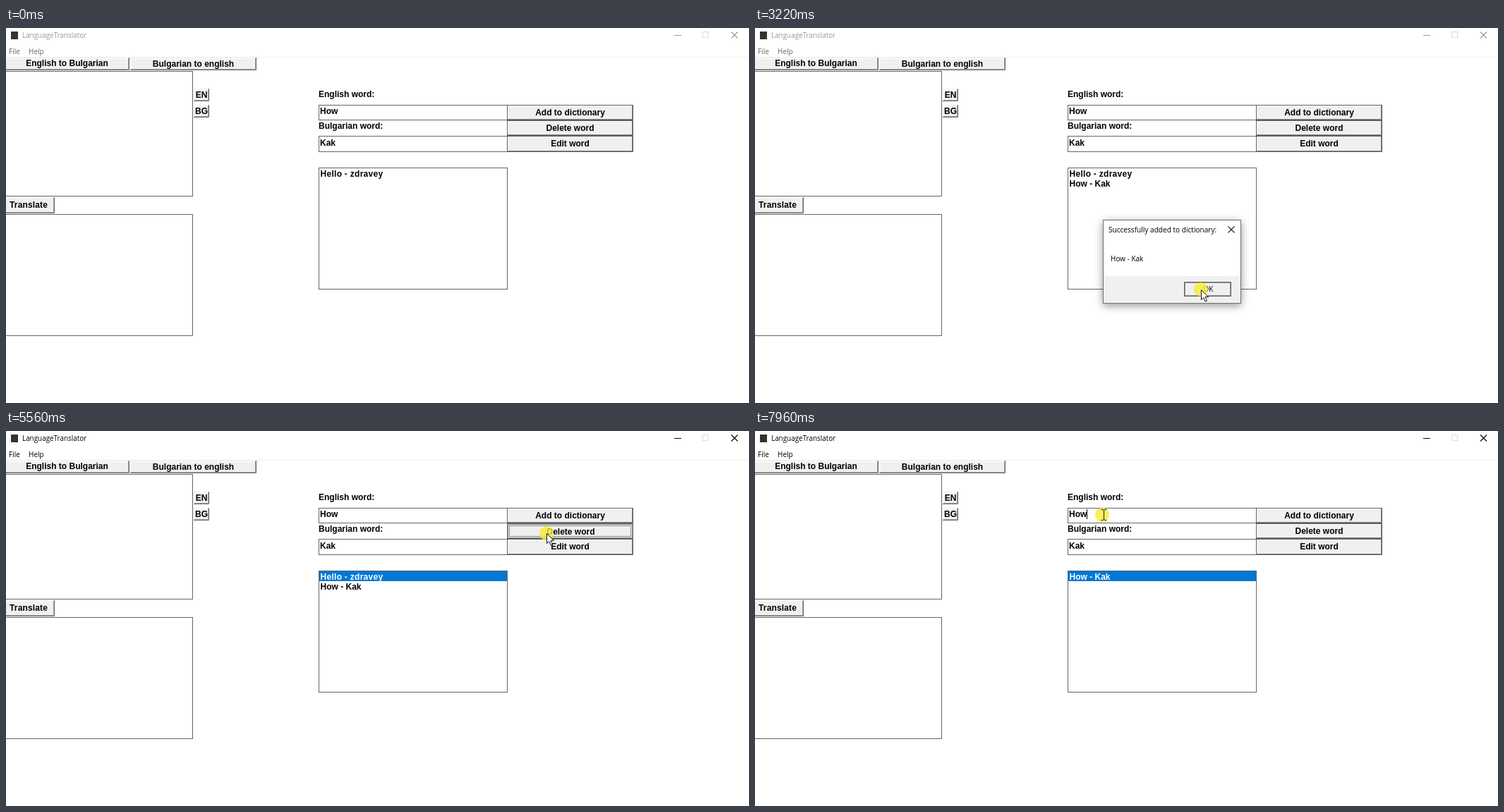
Write an HTML page that moves like this. It is 1053 px wide and 532 px high and loops after 8 s.

```html
<!DOCTYPE html>
<html lang="en">
<head>
<meta charset="utf-8">
<title>LanguageTranslator</title>
<style>
  html, body { margin: 0; width: 100%; height: 100%; overflow: hidden; background: #fff; }
  svg { display: block; width: 1053px; height: 532px; }
  text { white-space: pre; }
  .bold { font: bold 12px "Liberation Sans", Arial, sans-serif; }
  .ui { font: 10px "Open Sans", "Noto Sans", sans-serif; }
  .dialog { filter: drop-shadow(0 3px 6px rgba(0, 0, 0, .42)); }
</style>
</head>
<body>
<svg id="stage" viewBox="0 0 1053 532" xmlns="http://www.w3.org/2000/svg"></svg>
<script>
const LOOP = 8000;
const stage = document.getElementById('stage');

// Pointer moves: start, end, number of steps, target, optional bend
const START = [821, 417];
const MOVES = [
  [70, 440, 6, [533, 137]],
  [670, 1210, 8, [765, 109], [680, 92]],
  [1440, 1750, 5, [777, 116]],
  [2370, 2690, 5, [579, 410]],
  [2770, 2930, 3, [610, 379]],
  [3070, 3220, 3, [632, 371]],
  [3390, 3850, 7, [484, 212]],
  [4230, 4400, 3, [498, 204]],
  [4790, 5000, 4, [747, 147]],
  [5170, 5170, 1, [755, 147]],
  [5400, 5400, 1, [766, 145]],
  [5780, 6100, 5, [645, 370]],
  [6330, 6800, 7, [529, 229]],
  [6950, 6950, 1, [529, 226]],
  [7030, 7180, 3, [514, 207]],
  [7500, 7730, 4, [496, 122]],
  [7900, 7900, 1, [494, 119]]
];
const CLICKS = [[2070, 2140], [3220, 3390], [4540, 4620], [5560, 5630],
                [6250, 6330], [7260, 7360], [7900, LOOP]];
const FIELDS = [[443, 109, 267, 21], [443, 153, 267, 22]];

const within = (t, a, b) => t >= a && t < b;
const ease = u => u * u * (3 - 2 * u);

function pointerAt(t) {
  let from = START;
  for (const [a, b, steps, to, bend] of MOVES) {
    if (t < a) break;
    const gap = (b - a) / (steps - 1) || 1;
    const step = Math.min(steps - 1, Math.floor((t - a) / gap + .06));
    const u = ease((step + 1) / steps), v = 1 - u;
    const start = from;
    from = start.map((p, i) => {
      const mid = bend ? bend[i] : (p + to[i]) / 2;
      return Math.round(v * v * p + 2 * u * v * mid + u * u * to[i]);
    });
  }
  return from;
}

const rect = (x, y, w, h, fill, extra = '') =>
  `<rect x="${x}" y="${y}" width="${w}" height="${h}" fill="${fill}" ${extra}/>`;
const outline = (x, y, w, h, stroke, extra = '', fill = 'none') =>
  rect(x + .5, y + .5, w, h, fill, `stroke="${stroke}" ${extra}`);
const line = (d, stroke, width = 1) =>
  `<path d="${d}" fill="none" stroke="${stroke}" stroke-width="${width}"/>`;
const label = (x, y, text, fill = '#000', cls = 'bold', extra = '') =>
  `<text class="${cls}" x="${x}" y="${y}" fill="${fill}" ${extra}>${text}</text>`;
const centred = (x, y, text, cls = 'bold') =>
  label(x, y, text, '#000', cls, 'text-anchor="middle"');
const dotted = (x, y, w, h, color) => outline(x, y, w, h, color, 'stroke-dasharray="1 1"');
const cross = (x, y, color) =>
  line(`M${x} ${y}l9 9m0 -9l-9 9`, color, 1.1);

function button(x, y, w, h, text, { framed = false, pressed = false, focus = false, cls = 'bold' } = {}) {
  let out = rect(x, y, w, h, '#f0f0f0');
  const shift = pressed ? 1 : 0;
  if (pressed) {
    out += outline(x, y, w - 1, h - 1, '#696969') + outline(x + 1, y + 1, w - 3, h - 3, '#909090');
  } else {
    const r = x + w, b = y + h;
    out += line(`M${x + 1.5} ${b - 1}V${y + 1.5}H${r - 1}`, '#fff');
    out += line(`M${r - 1.5} ${y + 1}V${b - 1.5}H${x + 1}`, '#a0a0a0');
    out += framed ? outline(x, y, w - 1, h - 1, '#5f5f5f')
                  : line(`M${r - .5} ${y}V${b - .5}H${x}`, '#696969');
    if (framed) out += line(`M${r - 1.5} ${y + 1}V${b - 1.5}H${x + 1}`, '#808080');
  }
  if (focus) out += dotted(x + 3, y + 3, w - 7, h - 7, '#222');
  const drop = cls === 'ui' ? 3 : 4;
  return out + centred(x + w / 2 + shift, Math.floor(y + h / 2) + drop + shift, text, cls);
}

function titleBar(active) {
  const ink = active ? '#000' : '#999';
  const menu = active ? '#000' : '#666';
  return rect(7, 5, 10, 11, '#333') +
    label(23, 14, 'LanguageTranslator', ink, 'ui', 'style="font-size:9.9px"') +
    label(4, 36.5, 'File', menu, 'ui') + label(32, 36.5, 'Help', menu, 'ui') +
    line('M947 10.5H957', ink) + outline(987, 5, 8, 8, '#ddd') + cross(1028, 5.5, ink) +
    line('M0 41.5H1053', '#efefef');
}

function listBox(rows, selected, focus) {
  let out = outline(443, 198, 267, 172, '#646464', '', '#fff');
  rows.forEach((text, i) => {
    const y = 199 + i * 14, on = i === selected;
    if (on) out += rect(444, y, 266, 14, '#0078d7');
    if (on && focus) out += dotted(444, y, 265, 13, '#ff8728');
    const spacing = text.startsWith('Hello') ? 'letter-spacing=".28"' : '';
    out += label(445.5, y + 12, text, on ? '#fff' : '#000', 'bold', spacing);
  });
  return out;
}

function dialog(title, message, pressed) {
  return `<g class="dialog">${rect(493, 272, 196, 119, '#fff')}</g>` +
    rect(494, 352, 194, 38, '#f0f0f0') + outline(493, 272, 195, 118, '#707070') +
    label(501, 290, title, '#000', 'ui', 'style="font-size:10.1px"') +
    label(504, 330.5, message, '#000', 'ui') + cross(670.5, 281.5, '#222') +
    button(608, 360, 67, 21, 'OK', { framed: true, pressed, cls: 'ui' });
}

function pointer([x, y], clicked) {
  const overField = FIELDS.some(([fx, fy, w, h]) => x > fx && x < fx + w && y > fy && y < fy + h);
  const halo = clicked ? `<circle cx="${overField ? x - 2 : x}" cy="${y}" r="10" fill="#f8ec30" fill-opacity=".78"/>` : '';
  const shape = overField
    ? line(`M${x - 3.5} ${y - 7.5}h2.5l1.5 1l1.5 -1h2.5M${x + .5} ${y - 7}v14M${x - 3.5} ${y + 7.5}h2.5l1.5 -1l1.5 1h2.5`, '#222')
    : `<path transform="translate(${x + .5} ${y})" d="M0 .5V14.5L3.2 11.5L5.7 17L8 16L5.6 10.6H10Z" fill="#fff" stroke="#111"/>`;
  return halo + shape;
}

function scene(t) {
  const adding = within(t, 2140, 3390), deleting = within(t, 5630, 6330);
  const active = t >= 2070 && !adding && !deleting;
  const clicked = CLICKS.some(([a, b]) => within(t, a, b));
  const addDown = within(t, 2070, 2140), deleteDown = within(t, 5560, 5630);

  const rows = t < 2140 ? ['Hello - zdravey']
    : t < 5630 ? ['Hello - zdravey', 'How - Kak'] : ['How - Kak'];
  const selected = within(t, 4540, 5630) || t >= 7260 ? 0 : -1;
  const listFocus = within(t, 4540, 5560) || within(t, 7260, 7960);

  let out = rect(0, 0, 1053, 532, '#fff') + titleBar(active) +
    button(-2, 42, 177, 18, '') + centred(86.5, 54, 'English to Bulgarian') +
    button(176, 42, 179, 18, 'Bulgarian to english') +
    outline(-2, 61, 266, 177, '#646464') + outline(-2, 264, 266, 172, '#646464') +
    button(-2, 240, 71, 23, '') + label(5, 255, 'Translate', '#000', 'bold', 'letter-spacing=".15"') +
    button(266, 86, 22, 18, 'EN') + button(266, 109, 22, 18, 'BG') +
    label(443, 98, 'English word:') + label(443, 143, 'Bulgarian word:') +
    FIELDS.map(([x, y, w, h]) => outline(x, y, w, h, '#646464')).join('') +
    label(445, 122, 'How') + label(445, 167, 'Kak') +
    button(710, 109, 179, 22, 'Add to dictionary', { framed: true, pressed: addDown, focus: addDown }) +
    button(710, 131, 179, 22, 'Delete word', { framed: true, pressed: deleteDown, focus: deleteDown }) +
    button(710, 153, 179, 23, 'Edit word', { framed: true }) +
    listBox(rows, selected, listFocus);

  if (t >= 7960) out += line('M470.5 111V125', '#000');
  if (adding) out += dialog('Successfully added to dictionary:', 'How - Kak', clicked);
  if (deleting) out += dialog('Successfully deleted word:', 'Hello - zdravey', clicked);
  if (t >= 70) out += pointer(pointerAt(t), clicked);
  return out;
}

let shown = '';
const began = performance.now();
function draw() {
  const next = scene((performance.now() - began) % LOOP);
  if (next !== shown) stage.innerHTML = shown = next;
  requestAnimationFrame(draw);
}
draw();
</script>
</body>
</html>
```
